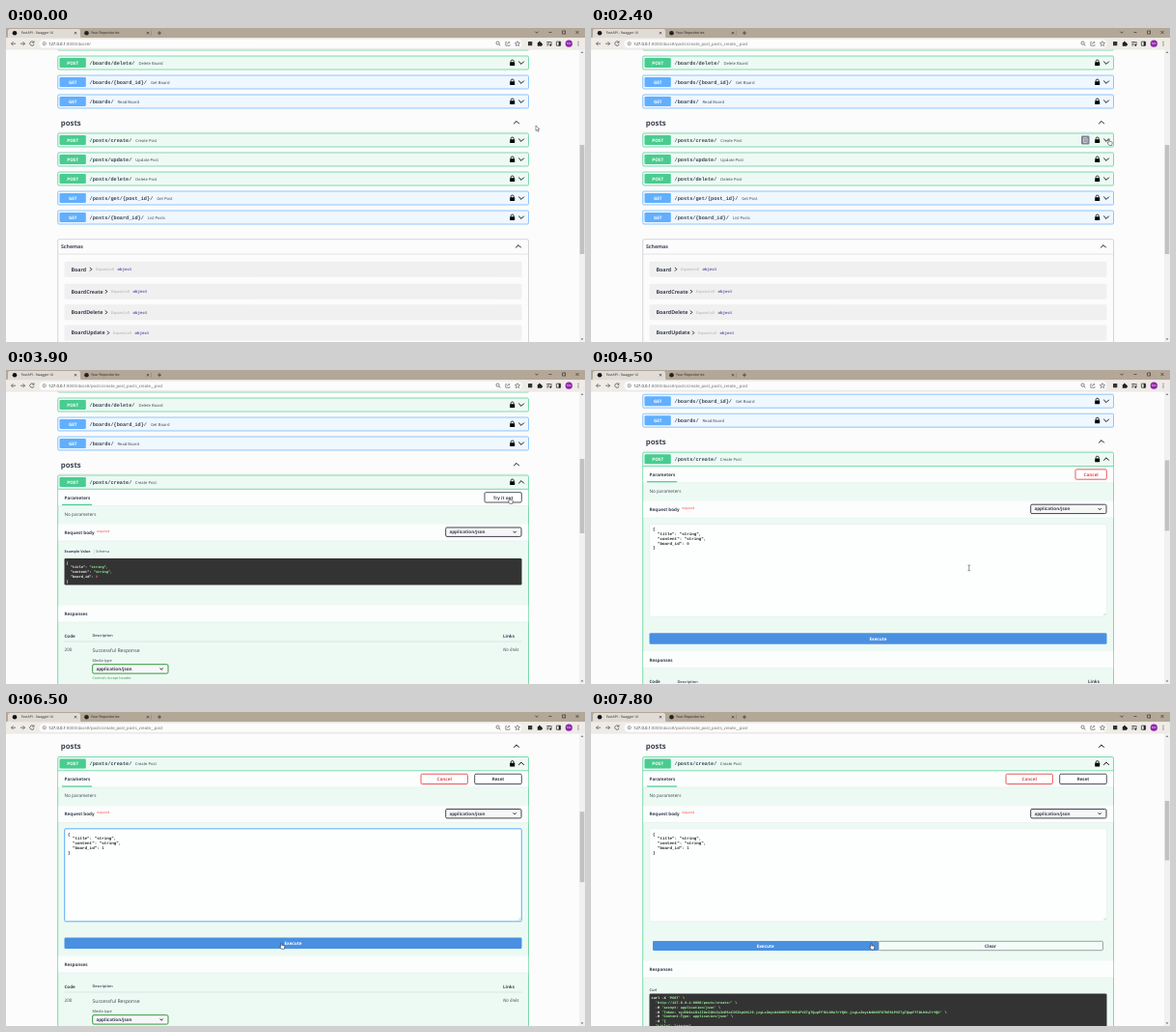
Recreate the animation shown at these times as an HTML page. Size 600 by 325 pixels, loop 8000 ms.

```html
<!DOCTYPE html>
<html lang="en">
<head>
<meta charset="utf-8">
<title>API docs</title>
<style>
html, body { margin: 0; width: 600px; height: 325px; overflow: hidden; background: #fcfcfc; }
svg { display: block; }
text { font-family: "Open Sans", "Noto Sans", sans-serif; fill: #3b4151; text-rendering: geometricPrecision; white-space: pre; }
.b { font-weight: 700; }
.sb { font-weight: 600; }
.i { font-style: italic; }
.m { font-family: "Liberation Mono", "DejaVu Sans Mono", monospace; font-weight: 700; }
.c { text-anchor: middle; }
</style>
</head>
<body>
<svg id="stage" width="600" height="325" viewBox="0 0 600 325"></svg>
<script>
(() => {
const GREEN = '#49cc90', BLUE = '#61affe', INK = '#3b4151', LEAF = '#a2fca2';
const LOOP = 8000;

// Markup helpers; text is placed by its vertical middle.
const esc = s => s.replace(/&/g, '&amp;').replace(/</g, '&lt;');
const text = (x, y, s, size, cls = '', fill = INK) =>
  `<text x="${x}" y="${y + size * 0.36}" font-size="${size}" class="${cls}" style="fill:${fill}">${esc(s)}</text>`;
const rect = (x, y, w, h, fill, stroke = 'none', r = 0, sw = 0.7) =>
  `<rect x="${x}" y="${y}" width="${w}" height="${h}" rx="${r}" fill="${fill}" stroke="${stroke}" stroke-width="${sw}"/>`;
const path = (d, stroke = '#222', sw = 0.8, fill = 'none') =>
  `<path d="${d}" fill="${fill}" stroke="${stroke}" stroke-width="${sw}"/>`;
const dot = (x, y, r, fill) => `<circle cx="${x}" cy="${y}" r="${r}" fill="${fill}"/>`;
const group = (id, body) => `<g id="${id}">${body}</g>`;
const chevron = (x, y, up, w = 2.8, sw = 1) => {
  const h = up ? -w / 2 : w / 2;
  return path(`M${x - w} ${y - h}L${x} ${y + h}L${x + w} ${y - h}`, '#111', sw);
};
const lock = (x, y) => rect(x - 2.5, y - 0.8, 5, 3.8, '#000', 'none', 0.5) +
  path(`M${x - 1.5} ${y - 0.5}v-1a1.5 1.5 0 0 1 3 0v1`, '#000', 0.8);

function summary(y, method, url, label, gap, up) {
  const color = method === 'POST' ? GREEN : BLUE;
  return rect(55.5, y - 5, 27.3, 10, color, 'none', 1.2) +
    text(69.2, y, method, 4.6, 'b c', '#fff') +
    text(86.5, y, url, 5.22, 'm') +
    text(86.5 + url.length * 3.13 + gap, y + 0.5, label, 4.15) +
    lock(524.7, y) + chevron(534, y, up);
}
function row(y, method, url, label, gap = 4) {
  const post = method === 'POST';
  return rect(53.7, y - 7, 487.8, 14, post ? '#edfaf4' : '#eff7ff', post ? GREEN : BLUE, 1.3) +
    summary(y, method, url, label, gap, false);
}
const button = (x, y, w, h, label, color) =>
  rect(x, y, w, h, '#fff', color, 1.3, 0.9) + text(x + w / 2, y + h / 2, label, 4.6, 'b c', color);
const select = (x, y, color) => rect(x, y, 78.3, 9.4, '#f7f7f7', color, 1.3, 1) +
  text(x + 3.7, y + 4.6, 'application/json', 4.6, 'b') + chevron(x + 71.5, y + 4.7, false, 1.6, 0.9);
const band = (y, h) => rect(54.2, y, 487, h, '#fbfefd') + path(`M54 ${y + h}H541`, '#dfe9e4', 0.5);

// Lines of code; strings and numbers after a colon get their own colour.
function code(x, y, lines, size, pitch, plain, quoted) {
  return lines.map((line, i) => {
    let n = 0;
    return line.split(/(?<=: )/).map(part => {
      const fill = /^"string/.test(part) ? quoted : /^\d/.test(part) ? '#d36363' : plain;
      const out = text(x + n * size * 0.6, y + i * pitch, part, size, 'm', fill);
      n += part.length;
      return out;
    }).join('');
  }).join('');
}
const json = ['{', '  "title": "string",', '  "content": "string",', '  "board_id": '];

function schema(y, name, end) {
  return rect(60.5, y - 8, 474, 16, '#f0f0f0', 'none', 1.2) +
    text(67.5, y, name, 5.3, 'b') +
    path(`M${end + 3} ${y - 1.8}l1.8 1.8l-1.8 1.8`, '#111', 0.9) +
    text(end + 9, y + 0.2, 'Expand all', 3.9, '', '#a5a8ae') +
    text(end + 31.5, y + 0.2, 'object', 4.15, 'm', '#5555a8');
}

const upper = row(16, 'POST', '/boards/update/', 'Update Board') +
  row(36, 'POST', '/boards/delete/', 'Delete Board') +
  row(56, 'GET', '/boards/{board_id}/', 'Get Board') +
  row(76, 'GET', '/boards/', 'Read Board') +
  text(56.8, 97.8, 'posts', 7.8, 'b') + chevron(529, 97.8, true) +
  path('M54 107.5H541', '#e6e6e8', 0.5);

const folded = row(116, 'POST', '/posts/create/', 'Create Post') +
  row(136, 'POST', '/posts/update/', 'Update Post') +
  row(156, 'POST', '/posts/delete/', 'Delete Post') +
  row(176, 'GET', '/posts/get/{post_id}/', 'Get Post') +
  row(196, 'GET', '/posts/{board_id}/', 'List Posts') +
  rect(53.7, 218.7, 487.8, 150, 'none', '#c4c6cb', 1.3) +
  text(57, 226, 'Schemas', 5.2, 'b') + chevron(531, 226, true) +
  path('M54 234H541', '#d4d5d9', 0.6) +
  schema(249.7, 'Board', 84) + schema(272.8, 'BoardCreate', 100) +
  schema(294.3, 'BoardDelete', 100) + schema(315.5, 'BoardUpdate', 102);

const unfolded = rect(53.7, 109, 487.8, 400, '#edfaf4', GREEN, 1.3) +
  summary(116, 'POST', '/posts/create/', 'Create Post', 3.5, true) +
  path('M54 123.3H541.3', GREEN, 0.7) +
  band(124, 16.5) + text(60.5, 132, 'Parameters', 4.6, 'b') +
  path('M58 139.5H89', GREEN, 1.2) +
  text(60.5, 149.3, 'No parameters', 4.7) +
  band(159.5, 17.5) + text(60.5, 168, 'Request body', 4.6, 'b') +
  text(94, 166.6, 'required', 3.3, '', '#f33') + select(455.7, 163, '#41444e');

const responses = band(243.5, 17.5) + text(60.5, 252.2, 'Responses', 4.6, 'b');
const table = text(60.5, 275, 'Code', 4.5, 'b') + text(89.5, 275, 'Description', 3.8, 'sb') +
  text(515, 275, 'Links', 4.5, 'b') + path('M60.5 281H534.5', '#c9d6d0', 0.6) +
  text(60.5, 289.3, '200', 4.6) + text(89.5, 289.8, 'Successful Response', 5.1) +
  text(515, 289.3, 'No links', 4.7, 'i') + text(89.5, 301, 'Media type', 3.9) +
  select(89.7, 304.7, '#2f9a3a') + text(89.5, 319, 'Controls Accept header.', 3.7, '', '#2f9a3a');

const example = button(496, 126.7, 38.3, 10.3, 'Try it out', INK) +
  text(60.5, 188, 'Example Value', 3.7, 'b') + path('M91.3 185.5v5', '#b5bfba', 0.5) +
  text(93, 188, 'Schema', 3.8) +
  rect(60.5, 195, 474, 27.5, '#333', 'none', 1.3) +
  code(62.5, 199.4, [...json.slice(0, 3), json[3] + '0', '}'], 3.62, 4.72, '#fff', LEAF);

const editor = group('cancel', button(502, 126.7, 32.3, 10.3, 'Cancel', '#e5484d')) +
  group('reset', button(430, 126.7, 48.4, 10.3, 'Cancel', '#e5484d') + button(485.7, 126.7, 48.6, 10.3, 'Reset', INK)) +
  rect(60.7, 183.3, 473.6, 96, '#fdfffe', '#e3ece8', 1.2, 0.6) +
  group('focus', rect(60.7, 183.3, 473.6, 96, 'none', BLUE, 1.2, 1)) +
  path('M531 278l2.5-2.5M532.3 278l1.2-1.2', '#999', 0.4) +
  group('mark', rect(99.3, 200.9, 2.7, 4.9, '#3390ff')) +
  code(64, 188.7, json, 4.2, 4.75, '#222', '#222') + text(64, 207.7, '}', 4.2, 'm', '#222') +
  '<text id="digit" x="99.3" y="204.46" font-size="4.2" class="m"></text>' +
  group('caret', path('M102.2 200.8v4.8', '#000', 0.4));

// A made-up token from a small seeded generator.
function token(n) {
  const set = 'ABCDEFGHIJKLMNOPQRSTUVWXYZabcdefghijklmnopqrstuvwxyz0123456789';
  let seed = 7, out = '';
  while (out.length < n) {
    seed = (seed * 16807) % 2147483647;
    out += set[seed % set.length];
  }
  return out;
}
const curl = ["curl -X 'POST' \\", "  'http://127.0.0.1:8000/posts/create/' \\", "  -H 'accept: application/json' \\",
  `  -H 'Token: eyJhbGciOiJIUzI1NiIsInR5cCI6IkpXVCJ9.${token(44)}.${token(43)}' \\`,
  "  -H 'Content-Type: application/json' \\", "  -d '{", '  "title": "string",'];
const curlText = curl.map((line, i) => {
  const from = Math.max(0, line.indexOf("'")), to = line.endsWith(' \\') ? line.length - 2 : line.length;
  const part = (a, b, fill) => text(62.5 + a * 2.172, 358.6 + i * 4.7, line.slice(a, b), 3.62, 'm', fill);
  return part(0, from, '#fff') + part(from, to, LEAF) + part(to, line.length, '#fff');
}).join('');

const run = rect(60.5, 296, 474, 11.5, '#4990e2', 'none', 1.3) + text(297.5, 301.8, 'Execute', 4.6, 'b c', '#fff');
const result = rect(64, 299.5, 234, 10, '#4990e2', 'none', 1.2) + text(180.7, 304.5, 'Execute', 4.6, 'b c', '#fff') +
  rect(298, 299.8, 232.5, 9.4, '#f4fcf8', '#777b85', 1.2) + text(414, 304.5, 'Clear', 4.6, 'b c') +
  `<g transform="translate(0 76.5)">${responses}</g>` + text(60.5, 350.4, 'Curl', 3.9, 'sb') +
  rect(60.5, 354, 474, 90, '#333', 'none', 1.3) + curlText;

const copy = rect(508, 111.5, 8.5, 9, '#7d8492', 'none', 1.2) +
  rect(510.3, 113.7, 3.8, 4.8, 'none', '#fff', 0.3, 0.6) + path('M511.2 115.3h2M511.2 116.8h2', '#fff', 0.5);

const cross = (x, y, r) => path(`M${x - r} ${y - r}l${2 * r} ${2 * r}m0 ${-2 * r}l${-2 * r} ${2 * r}`, '#222', 0.6);
const browser = rect(0, 0, 600, 10.5, '#b3a798') +
  path('M0 10.5Q2 10.5 2 8V3Q2 1 4 1H75Q77 1 77 3V8Q77 10.5 79 10.5Z', 'none', 0, '#e0dbd5') +
  dot(9, 5.2, 2.3, '#111') + text(15.8, 5.2, 'FastAPI - Swagger UI', 3.5, '', '#222') + cross(72, 5.2, 1.2) +
  dot(83.5, 5.2, 2.3, '#222') + text(88, 5.2, 'Your Repositories', 3.6, '', '#222') + cross(147, 5.2, 1.2) +
  path('M150.5 2.5v5.5', '#877865', 0.4) + path('M157 5.2h4M159 3.2v4', '#222', 0.6) +
  chevron(550, 4.5, false, 1.6, 0.6) + path('M562.5 4.5h3', '#222', 0.6) +
  rect(576.7, 3, 3, 3, 'none', '#222', 0, 0.6) + cross(592, 4.5, 1.5) +
  rect(0, 10.2, 600, 12, '#efece8') + rect(34.5, 11.7, 500, 9, '#fcfcfc', 'none', 4.5) +
  path('M10 16.2H5.5m2-2l-2 2l2 2M15 16.2h4.5m-2-2l2 2l-2 2M28.7 14.7a2.2 2.2 0 1 0 .4 2M29 13.5v1.7h-1.7', '#444', 0.7) +
  `<circle cx="39.7" cy="16.2" r="1.7" fill="none" stroke="#555" stroke-width=".5"/>` + path('M39.7 16v1.1M39.7 15.1v.4', '#555', 0.5) +
  '<text id="url" x="44" y="17.7" font-size="4.25" style="fill:#666"><tspan fill="#222">127.0.0.1</tspan><tspan id="route"></tspan></text>' +
  path('M510.7 16.7l1.7 1.7M508 15.6a1.6 1.6 0 1 0 3.2 0a1.6 1.6 0 1 0-3.2 0', '#333', 0.6) +
  path('M519 14.6h-1.2v3.7h4.2v-1.2M519.3 16.8q.3-2 2.6-2m-1-1l1 1l-1 1', '#333', 0.5) +
  path('M530 13.6l.8 1.7l1.8.2l-1.4 1.2l.4 1.9l-1.6-1l-1.6 1l.4-1.9l-1.4-1.2l1.8-.2Z', '#333', 0.5) +
  rect(541, 14, 4.3, 4.3, '#333', 'none', 0.5) +
  path('M550.8 15h1.3a.9.9 0 1 1 1.6 0h1.4v1.3a.8.8 0 1 1 0 1.5v1h-4.3Z', 'none', 0, '#222') +
  path('M560.3 14.5h4M560.3 16.2h3M560.3 17.9h2M565 14v3.6', '#222', 0.7) + dot(564.3, 17.7, 1, '#222') +
  rect(570.4, 14.1, 4.2, 4.2, 'none', '#222', 0.3, 0.7) + rect(572.7, 14.1, 1.9, 4.2, '#222') +
  dot(583.3, 16.2, 3.6, '#8e24aa') + text(583.3, 16, 'Mo', 3.2, 'c', '#fff') +
  [14.3, 16.2, 18.1].map(y => dot(593, y, 0.5, '#222')).join('') +
  path('M0 22.2H600', '#dedbd6', 0.4) +
  rect(594, 22.4, 6, 303, '#f1f1f1') + path('M595.7 25.8l1.3-1.6l1.3 1.6Z', 'none', 0, '#555') +
  path('M595.7 321.4l1.3 1.6l1.3-1.6Z', 'none', 0, '#555') +
  '<rect id="thumb" x="594.7" width="4.6" fill="#c1c1c1"/>';

const pointers =
  group('arrow', path('M0 0V5.4L1.3 4.3L2.2 6.3L3.1 5.9L2.2 3.9H3.9Z', '#000', 0.4, '#fff')) +
  group('hand', path('M-.5 .4Q0-.2 .5 .4V2.5L2.9 3Q3.6 3.2 3.5 4L3 6.6H.2L-1.6 4Q-1.4 3.2-.5 3.9Z', '#000', 0.45, '#fff')) +
  group('beam', path('M-1.3-2.8H-.4L0-2.5L.4-2.8H1.3M0-2.5V2.5M-1.3 2.8H-.4L0 2.5L.4 2.8H1.3', '#333', 0.55));

document.getElementById('stage').innerHTML =
  rect(0, 0, 600, 325, '#fcfcfc') +
  group('page', upper + group('folded', folded) +
    group('unfolded', unfolded + group('example', example) + group('editor', editor) +
      group('before', group('run', run) + group('answers', responses + table)) + group('result', result)) +
    group('copy', copy)) +
  browser + group('pointer', pointers);

const $ = id => document.getElementById(id);
const show = (id, on) => $(id).setAttribute('display', on ? 'inline' : 'none');
const move = (id, x, y) => $(id).setAttribute('transform', `translate(${x.toFixed(2)} ${y.toFixed(2)})`);

// Pointer stops: time, x, y.
const stops = [[0, 549, 101], [1400, 549, 101], [2200, 536.7, 114.8], [2900, 536.7, 114.8], [3700, 521.8, 131.8],
  [4100, 521.8, 131.8], [4500, 392.5, 205], [4700, 255, 178], [4950, 103, 141], [6150, 103, 141],
  [6500, 285.3, 238.7], [6900, 290.3, 239.3], [LOOP, 290.3, 239.3]];
function pointerAt(t) {
  const i = stops.findIndex(s => s[0] > t), a = stops[i - 1], b = stops[i];
  const k = (t - a[0]) / (b[0] - a[0]);
  return [a[1] + (b[1] - a[1]) * k, a[2] + (b[2] - a[2]) * k];
}
// Two wheel notches, the second following the first.
function scrollAt(t) {
  const k = Math.min(1, Math.max(0, (t - 4300) / 400));
  return k < 0.5 ? 47 * k : 23.5 + 39 * Math.sin((k - 0.5) * Math.PI);
}

function draw(t) {
  const open = t >= 2500, edit = t >= 4000, done = t >= 7100, changed = t >= 5500;
  const s = scrollAt(t), [x, y] = pointerAt(t), py = y + s;
  const inside = (x0, y0, x1, y1) => x > x0 && x < x1 && py > y0 && py < y1;

  move('page', 0, -s);
  show('folded', !open);
  show('unfolded', open);
  show('example', !edit);
  show('editor', edit);
  show('before', !done);
  show('run', edit);
  show('result', done);
  move('answers', 0, edit ? 71.5 : 0);
  show('cancel', edit && !changed);
  show('reset', changed);
  show('focus', t >= 5000 && t < 7000);
  show('mark', t >= 5200 && t < 5500);
  show('caret', t >= 5700 && t < 7000 && (t - 5700) % 1060 < 530);
  $('digit').textContent = t < 5500 ? '0' : t < 5700 ? '' : '1';
  $('route').textContent = ':8000/docs#/' + (t >= 2300 ? 'posts/create_post_posts_create__post' : '');

  const [ty, th] = !open ? [121, 113] : !edit ? [92, 77] : !done ? [87.5 + s * 0.25, 73] : [92, 61.5];
  $('thumb').setAttribute('y', ty);
  $('thumb').setAttribute('height', th);

  const onRow = inside(53, 109, 541.5, 123);
  const onButton = open && inside(edit ? 502 : 496, 126.5, 534.5, 137.2) || edit && inside(60, 296, 534.5, 309);
  const kind = onRow || onButton ? 'hand' : edit && inside(60, 183, 534, 279.5) ? 'beam' : 'arrow';
  show('copy', onRow);
  for (const k of ['arrow', 'hand', 'beam']) show(k, k === kind);
  show('pointer', t < 5500 || t >= 6150);
  move('pointer', x, y);
}

const start = performance.now();
function tick(now) {
  draw(Math.max(0, now - start) % LOOP);
  requestAnimationFrame(tick);
}
draw(0);
requestAnimationFrame(tick);
})();
</script>
</body>
</html>
```
